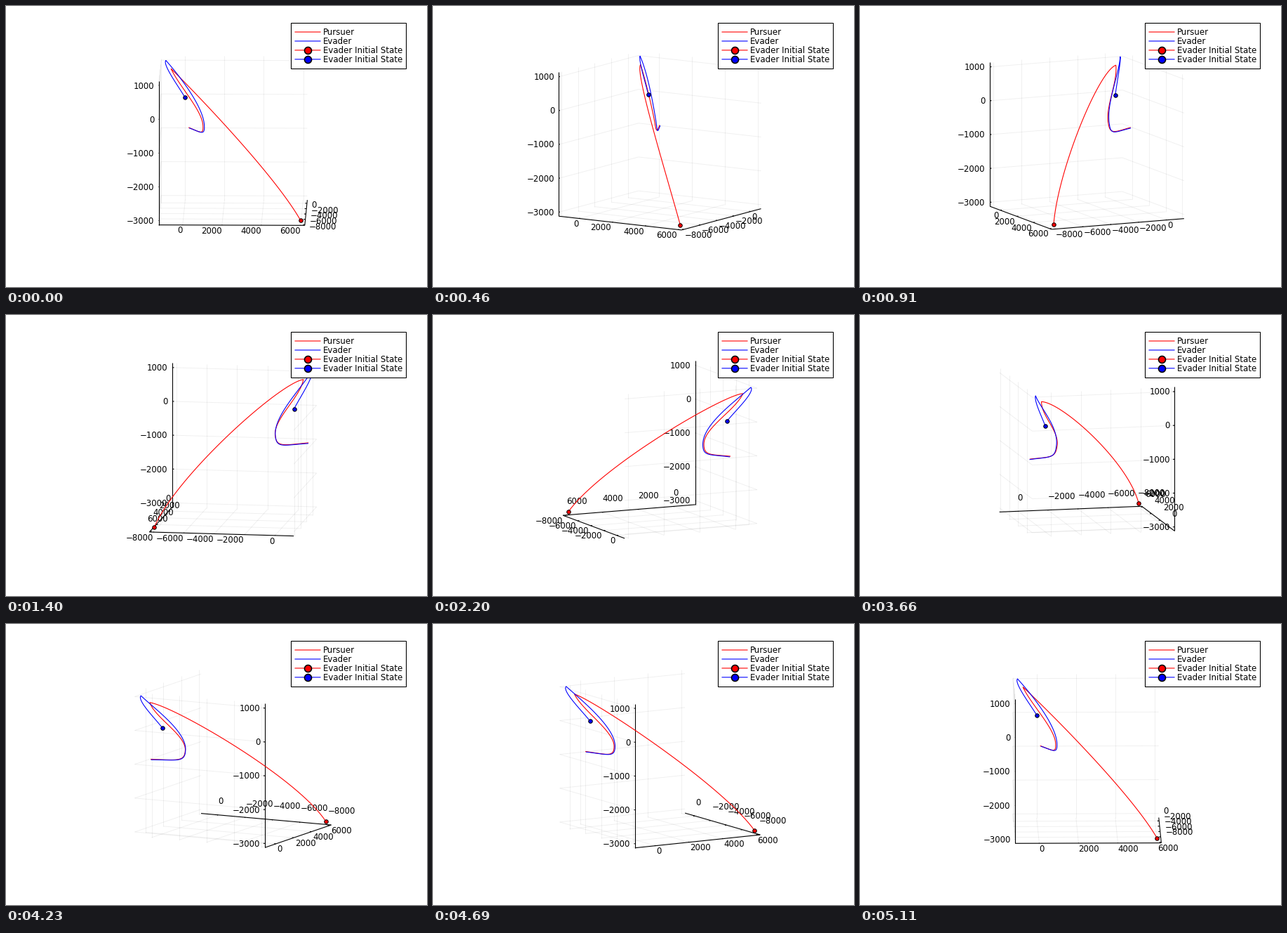
Animation of 600 by 400 pixels, one loop 5130 ms. Source, as a matplotlib script:

```python
import numpy as np
import matplotlib.pyplot as plt
from matplotlib.animation import FuncAnimation
from matplotlib.collections import LineCollection
from matplotlib.patches import Rectangle

W, H, DPI = 600, 400, 100
LOOP_MS, TICK_MS, CAMERA_FPS, DEG_PER_STEP = 5130, 15, 35, 2
PX = 72 / DPI                      # one pixel in points
CENTER = np.array([323.5, 191.4])
SCALE, ELEV = 104.1, np.radians(10)
FONT = dict(family="DejaVu Sans", size=8.5, color="black")

# chained cubic Bezier control points, in axis-box units (-1 to 1)
PURSUER = np.array([
    (.943, -.943, -.943), (.55, -.70, -.29), (-.75, .52, .80),
    (-.862, .838, .845), (-.76, .82, .62), (-.44, .475, .345),
    (-.421, .52, .125), (-.41, .54, -.03), (-.455, .64, 0), (-.62, .943, .01)])
EVADER = np.array([
    (-.671, .74, .466), (-.755, .80, .60), (-.985, .975, .88),
    (-.935, .938, .943), (-.74, .83, .74), (-.43, .49, .40),
    (-.403, .524, .135), (-.39, .541, -.04), (-.44, .62, 0), (-.611, .943, .003)])

# data extent with a 3 % margin
LO, HI = np.array([(-1010, -8000, -3000), (6000, 966, 1016)], float)
LO, HI = LO - 0.03 * (HI - LO), HI + 0.03 * (HI - LO)
TICKS = [np.arange(0, 6001, 2000), np.arange(-8000, 1, 2000),
         np.arange(-3000, 1001, 1000)]
# per axis: (near axis, its start, its end), far axis
NEAR = [(1, -1, 1), (0, 1, -1), (1, -1, 1)]
FAR = [2, 2, 0]


def bezier_chain(pts, n=40):
    t = np.linspace(0, 1, n)[:, None]
    u = 1 - t
    return np.vstack([
        u**3 * a + 3 * u**2 * t * b + 3 * u * t**2 * c + t**3 * d
        for a, b, c, d in (pts[i:i + 4] for i in range(0, len(pts) - 1, 3))])


def project(p, az):
    x, y, z = np.moveaxis(np.asarray(p, float), -1, 0)
    c, s = np.cos(az), np.sin(az)
    right = x * c + y * s
    up = z * np.cos(ELEV) + (y * c - x * s) * np.sin(ELEV)
    return CENTER + SCALE * np.stack([right, -up], axis=-1)


def corner(axis, value, near, far):
    p = np.empty(3)
    p[axis], p[NEAR[axis][0]], p[FAR[axis]] = value, near, far
    return p


grid, frame, anchors, names = [], [], [], []
for a in range(3):
    _, n0, n1 = NEAR[a]
    frame.append((corner(a, -1, n0, -1), corner(a, 1, n0, -1)))
    marks = 2 * (TICKS[a] - LO[a]) / (HI[a] - LO[a]) - 1
    for v in marks:
        base, back = corner(a, v, n0, -1), corner(a, v, n1, -1)
        grid += [(base, back), (back, corner(a, v, n1, 1))]
        frame.append((base, base + 0.012 * (back - base)))
    anchors.append(np.array([corner(a, v, n0, -1) for v in marks]))
    names.append([str(v).replace("-", "\u2212") for v in TICKS[a]])
grid, frame = np.array(grid), np.array(frame)

fig = plt.figure(figsize=(W / DPI, H / DPI), dpi=DPI, facecolor="white")
ax = fig.add_axes([0, 0, 1, 1])
ax.set(xlim=(0, W), ylim=(H, 0))
ax.axis("off")

grid_lines = LineCollection([], colors=[(0, 0, 0, 0.06)], linewidths=PX, zorder=1)
frame_lines = LineCollection([], colors="black", linewidths=1.1 * PX, zorder=2)
ax.add_collection(grid_lines, autolim=False)
ax.add_collection(frame_lines, autolim=False)
labels = [[ax.text(0, 0, s, ha="center", va="baseline", zorder=3, **FONT)
           for s in row] for row in names]


def dot(x, y, color, size, edge, z):
    return ax.plot([x], [y], "o", ms=size * PX, mfc=color, mec="black",
                   mew=edge * PX, zorder=z, snap=False)[0]


runs = []
for pts, color in ((PURSUER, "red"), (EVADER, "blue")):
    line, = ax.plot([], [], color=color, lw=1.1 * PX, zorder=4)
    runs.append((bezier_chain(pts), line, dot(0, 0, color, 5.5, 1, 5)))

ax.add_patch(Rectangle((406, 24), 164, 65, fc="white", ec="black",
                       lw=1.1 * PX, zorder=6))
for i, text in enumerate(["Pursuer", "Evader"] + ["Evader Initial State"] * 2):
    y, color = 37 + 12.95 * i, ("red", "blue")[i % 2]
    ax.plot([412, 448], [y, y], color=color, lw=1.1 * PX, zorder=7, snap=False)
    if i > 1:
        dot(429.7, y, color, 10, 1.6, 8)
    ax.text(452, y + 4.2, text, ha="left", va="baseline", zorder=8, **FONT)


def text_width(s):
    return 11.81 * sum(0.838 if c == "\u2212" else 0.636 for c in s)


def place_labels(axis, az):
    pos = project(anchors[axis], az)
    dx, dy = pos[1] - pos[0]
    for p, label in zip(pos, labels[axis]):
        half = text_width(label.get_text()) / 2
        if axis == 2:
            x, y = p[0] - 6.3 - half, p[1]
        else:
            # push outward across the axis, then justify by its direction
            r = np.hypot(dx, dy)
            side = -1 if dx > 0 and dy > 0 else 1
            x = p[0] - 6 * dy / r + side * half - 0.1
            y = p[1] + 6 * dx / r + (1.4 if dx > 0 else -14)
        label.set_position((x, y + 4.3))


def update(i):
    # the camera turns in hard steps, slower than the clock
    step = int((i + 1) * TICK_MS * CAMERA_FPS / 1000)
    az = np.radians(1 + DEG_PER_STEP * step)
    grid_lines.set_segments(project(grid, az))
    frame_lines.set_segments(project(frame, az))
    for axis in range(3):
        place_labels(axis, az)
    for path, line, start in runs:
        xy = project(path, az)
        line.set_data(xy[:, 0], xy[:, 1])
        start.set_data(xy[:1, 0], xy[:1, 1])
    return []


anim = FuncAnimation(fig, update, frames=LOOP_MS // TICK_MS, interval=TICK_MS,
                     repeat=True, repeat_delay=0, blit=False)
plt.show()
```
